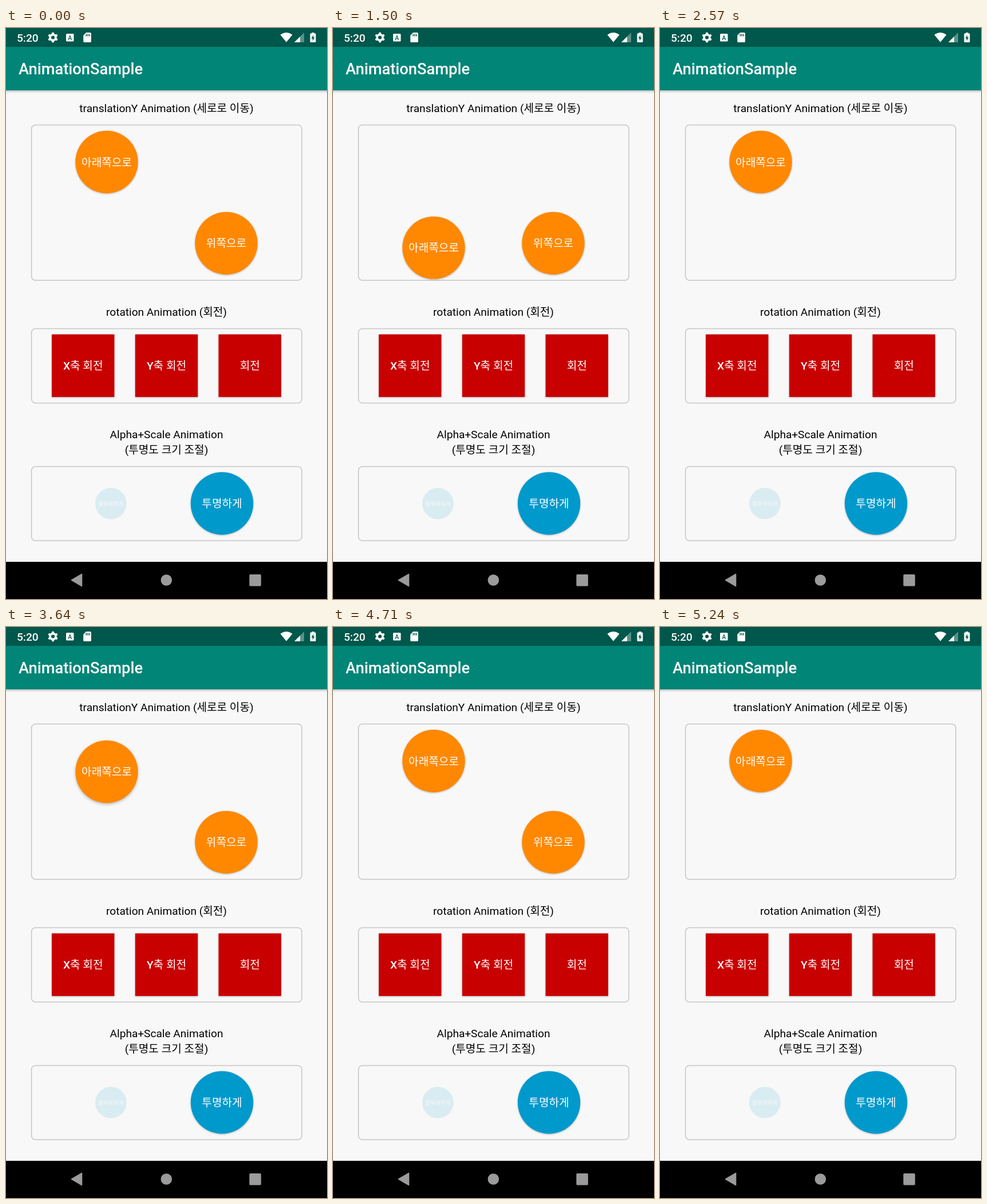
Write an HTML page that moves like this. It is 561x998 px and loops after 5.76 s.

```html
<!DOCTYPE html>
<html lang="ko">
<head>
<meta charset="utf-8">
<title>AnimationSample</title>
<style>
  html, body { margin: 0; width: 100%; height: 100%; overflow: hidden; background: #f8f8f8; }
  svg { display: block; width: 100%; height: 100%; }
  text { font: 400 19.1px Roboto, "Noto Sans CJK KR", "Noto Sans CJK", sans-serif; }
  .label, .button text { text-anchor: middle; }
  .button text { fill: #fff; }
  .medium { font-weight: 500; }
  .title { font-size: 27.3px; }
  .button { filter: drop-shadow(0 1.8px 1.5px rgba(0, 0, 0, .27)); }
  .frame { fill: none; stroke: #c6c6c6; stroke-width: 1.5; }
</style>
</head>
<body>
<svg viewBox="0 0 561 998" preserveAspectRatio="none">
  <defs>
    <clipPath id="box"><rect x="44" y="169" width="473.5" height="272.5"/></clipPath>
    <linearGradient id="barShadow" x2="0" y2="1">
      <stop stop-color="#000" stop-opacity=".2"/>
      <stop offset="1" stop-color="#000" stop-opacity="0"/>
    </linearGradient>
  </defs>

  <rect width="561" height="998" fill="#f8f8f8"/>
  <rect y="109" width="561" height="5" fill="url(#barShadow)"/>
  <rect width="561" height="109" fill="#008577"/>
  <rect width="561" height="33" fill="#00574b"/>
  <rect y="933" width="561" height="65"/>

  <!-- status bar -->
  <g fill="#fff">
    <text class="medium" x="19" y="24">5:20</text>
    <g id="gear" transform="translate(82 16.5)">
      <circle r="4.9" fill="none" stroke="#fff" stroke-width="3.6"/>
    </g>
    <rect x="105" y="10" width="13.5" height="13.5" rx="1.5"/>
    <text class="medium" x="111.7" y="20.5" style="font-size:10.5px;fill:#00574b;text-anchor:middle">A</text>
    <path d="M140 8h7.2q1.6 0 1.6 1.6v13.8q0 1.6-1.6 1.6h-10.4q-1.6 0-1.6-1.6v-10.5z"/>
    <path d="M140.2 10.5v4M143 10.5v4M145.8 10.5v4" stroke="#00574b" stroke-width="1.5"/>
    <path d="M479.5 12Q490 4 500.5 12L490 24.8z"/>
    <path d="M521 8v17h-17z" opacity=".35"/>
    <path d="M514 15v10h-10z"/>
    <path d="M534.3 9.6V8h4.4v1.6h1.6q1.2 0 1.2 1.2v13q0 1.2-1.2 1.2h-7.6q-1.2 0-1.2-1.2v-13q0-1.2 1.2-1.2z"/>
    <path d="M537.2 12.2v4.2h2.2l-3.6 6.2v-4.4h-2.2z" fill="#00574b"/>
    <text class="medium title" x="22" y="81">AnimationSample</text>
  </g>

  <text class="label" x="280.5" y="147">translationY Animation (세로로 이동)</text>
  <text class="label" x="280.5" y="503">rotation Animation (회전)</text>
  <text class="label" x="280.5" y="717">Alpha+Scale Animation</text>
  <text class="label" x="280.5" y="743.5">(투명도 크기 조절)</text>

  <rect class="frame" x="44.5" y="169.5" width="472.5" height="271.5" rx="7"/>
  <rect class="frame" x="44.5" y="525.5" width="472.5" height="130" rx="7"/>
  <rect class="frame" x="44.5" y="766.5" width="472.5" height="129.5" rx="7"/>

  <g clip-path="url(#box)">
    <g id="down"><g class="button">
      <circle cx="176" cy="234.3" r="54.7" fill="#ff8800"/>
      <text x="176" y="241.5">아래쪽으로</text>
    </g></g>
    <g id="up"><g class="button">
      <circle cx="385" cy="376.2" r="54.7" fill="#ff8800"/>
      <text x="385" y="383.3">위쪽으로</text>
    </g></g>
  </g>

  <g fill="#c80000">
    <g class="button">
      <rect x="80" y="535.5" width="109.4" height="109.4"/>
      <text x="134.7" y="597.3"><tspan class="medium">X</tspan>축 회전</text>
    </g>
    <g class="button">
      <rect x="225.8" y="535.5" width="109.4" height="109.4"/>
      <text x="280.5" y="597.3"><tspan class="medium">Y</tspan>축 회전</text>
    </g>
    <g class="button">
      <rect x="371.5" y="535.5" width="109.4" height="109.4"/>
      <text x="426.2" y="597.3">회전</text>
    </g>
  </g>

  <g fill="#0099cc">
    <g transform="translate(183.3 831) scale(.5)" opacity=".12"><g class="button">
      <circle r="54.7"/>
      <text y="7">불투명하게</text>
    </g></g>
    <g class="button">
      <circle cx="377.5" cy="831" r="54.7"/>
      <text x="377.5" y="838">투명하게</text>
    </g>
  </g>

  <!-- navigation bar -->
  <g fill="#9b9b9b">
    <path d="M114.5 965l18-10.5v21z" stroke="#9b9b9b" stroke-width="1.5" stroke-linejoin="round"/>
    <circle cx="280.3" cy="965" r="9.8"/>
    <rect x="425.3" y="955" width="20.5" height="20.5" rx="1.8"/>
  </g>
</svg>
<script>
  const LOOP = 5760, DURATION = 1000, DISTANCE = 779;
  const downRuns = [{ start: 1212, reset: 2160 }, { start: 3542, reset: 4710 }];
  const upRuns = [{ start: 2160, reset: 3460 }, { start: 4825, reset: LOOP }];
  const down = document.getElementById('down');
  const up = document.getElementById('up');
  const downButton = down.firstElementChild;

  const gear = document.getElementById('gear');
  for (let angle = 0; angle < 360; angle += 60) {
    gear.insertAdjacentHTML('beforeend',
      `<path d="M-2.4-5.5L-1.7-8.8H1.7L2.4-5.5z" transform="rotate(${angle})"/>`);
  }

  const ease = p => (1 - Math.cos(Math.PI * Math.min(1, Math.max(0, p)))) / 2;

  function offset(runs, t) {
    const run = runs.find(r => t >= r.start && t < r.reset);
    return run ? DISTANCE * ease((t - run.start) / DURATION) : 0;
  }

  // A pressed button rises for a moment, which widens its shadow.
  function lift(runs, t) {
    return Math.max(...runs.map(({ start }) =>
      Math.max(0, Math.min(1, (t - start + 80) / 100, (start + 220 - t) / 100))));
  }

  function draw(now) {
    const t = now % LOOP;
    const rise = lift(downRuns, t);
    down.setAttribute('transform', `translate(0 ${offset(downRuns, t)})`);
    up.setAttribute('transform', `translate(0 ${-offset(upRuns, t)})`);
    downButton.style.filter =
      `drop-shadow(0 ${1.8 + rise}px ${1.5 + 1.3 * rise}px rgba(0, 0, 0, .27))`;
  }

  const begin = performance.now();
  function tick() {
    draw(performance.now() - begin);
    requestAnimationFrame(tick);
  }
  tick();
</script>
</body>
</html>
```
